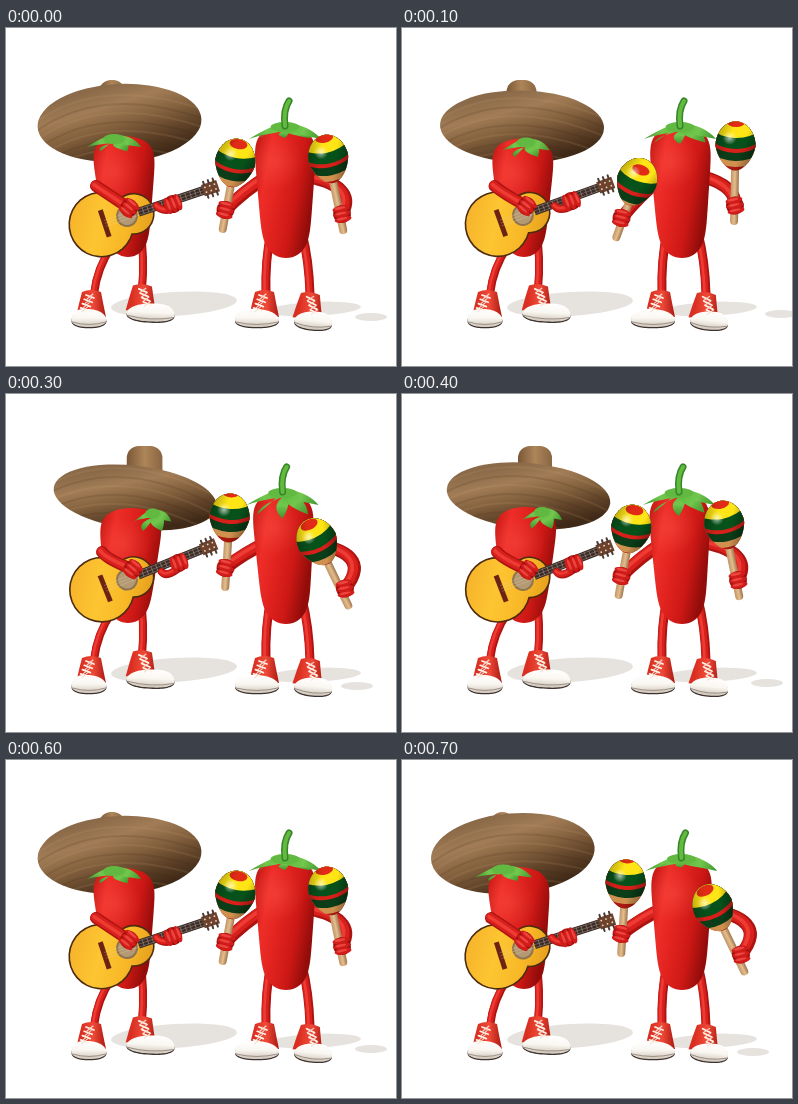
Write an HTML page with a canvas that moves like this. It is 390 px wide and 338 px high and loops after 800 ms.

```html
<!DOCTYPE html>
<html>
<head>
<meta charset="utf-8">
<style>
html, body { margin: 0; height: 100%; overflow: hidden; background: #fff; }
canvas { display: block; }
</style>
</head>
<body>
<canvas id="stage" width="390" height="338"></canvas>
<script>
const c = document.getElementById('stage').getContext('2d');
c.lineCap = c.lineJoin = 'round';

const lerp = (a, b, k) => a + (b - a) * k;
const CLEAR_RED = 'rgba(255,95,80,0)';

function grad(x0, y0, x1, y1, ...colors) {
  const g = c.createLinearGradient(x0, y0, x1, y1);
  colors.forEach((col, i) => g.addColorStop(i / (colors.length - 1), col));
  return g;
}

function glow(x, y, r, inner, outer) {
  const g = c.createRadialGradient(x, y, 0, x, y, r);
  g.addColorStop(0, inner);
  g.addColorStop(1, outer);
  return g;
}

function oval(x, y, rx, ry, fill, rot = 0) {
  c.beginPath();
  c.ellipse(x, y, rx, ry, rot, 0, 7);
  c.fillStyle = fill;
  c.fill();
}

function line(x0, y0, x1, y1, width, color) {
  curve([x0, y0, (x0 + x1) / 2, (y0 + y1) / 2, x1, y1], width, color);
}

function curve([x0, y0, ...rest], width, color) {
  c.beginPath();
  c.moveTo(x0, y0);
  c.quadraticCurveTo(...rest);
  c.lineWidth = width;
  c.strokeStyle = color;
  c.stroke();
}

// Closed outline from a function of 0..1
function outline(point, fill) {
  c.beginPath();
  for (let i = 0; i < 80; i++) c.lineTo(...point(i / 80));
  c.closePath();
  c.fillStyle = fill;
  c.fill();
}

function limb(p, w) {
  curve(p, w, '#ac1411');
  c.save();
  c.translate(-w * .08, -w * .06);
  curve(p, w * .74, '#d8201c');
  c.translate(-w * .08, -w * .05);
  curve(p, w * .3, '#ee3b34');
  c.restore();
}

function fist(x, y, rot) {
  c.save();
  c.translate(x, y);
  c.rotate(rot);
  oval(0, 0, 9, 9, '#9c0f0e');
  for (let i = -1; i < 2; i++) {
    oval(0, i * 5.4, 8.6, 3.3, '#d01d1a');
    oval(-1, i * 5.4 - .8, 5.5, 1.3, '#ec4540');
  }
  c.restore();
}

// Pepper body: rounded at both ends, narrowing downwards
function body(topX, topY, lowX, lowY, radius, taper) {
  const edge = t => radius * (1 - taper * t) * Math.sqrt(1 - (2 * t - 1) ** 6);
  const side = u => {
    const s = u < .5 ? 1 : -1, v = u < .5 ? u * 2 : 2 - u * 2;
    const t = (1 - Math.cos(v * Math.PI)) / 2;
    return [lerp(topX, lowX, t) + s * edge(t), lerp(topY, lowY, t)];
  };
  outline(side, grad(topX - radius, 130, topX + radius, 142, '#c21713', '#ee2d28', '#e0221e', '#cc1815', '#920c0a'));
  c.fillStyle = glow(topX - 9, topY + 36, 28, 'rgba(255,95,80,.35)', CLEAR_RED);
  c.fill();
}

function calyx(x, y, reach, droop, depth, lobes) {
  for (let i = 0; i < lobes; i++) {
    const a = Math.PI * i / (lobes - 1);
    const tx = x - reach * Math.cos(a), ty = y + droop + depth * Math.sin(a);
    const mx = (x + tx) / 2, my = (y + ty) / 2 - 4, w = 4 + 5 * Math.sin(a);
    c.beginPath();
    c.moveTo(x, y - 3);
    c.quadraticCurveTo(mx + w * 1.4, my - 4, tx, ty);
    c.quadraticCurveTo(mx - w * 1.4, my + 6, x, y + 5);
    c.fillStyle = grad(x, y, tx, ty, '#5bb83a', '#72c74e', '#3f942c');
    c.fill();
  }
  oval(x, y + 1, reach * .4, 5, '#62b941');
}

function shoe(x, y, toeX, half, tilt) {
  const dir = Math.sign(toeX - x);
  c.save();
  c.translate(x, y);
  c.rotate(tilt);
  c.beginPath();
  c.moveTo(-9, 1);
  c.quadraticCurveTo(0, -3, 10, 1);
  c.quadraticCurveTo(12, 12, 15, 26);
  c.lineTo(-15, 26);
  c.quadraticCurveTo(-12, 12, -9, 1);
  c.fillStyle = grad(-10, 0, 14, 0, '#d92f22', '#f04a38', '#b01d15');
  c.fill();
  const tx = toeX - x;
  const sole = drop => u => {
    const co = Math.cos(u * 2 * Math.PI), si = Math.sin(u * 2 * Math.PI);
    return [tx + half * Math.sign(co) * Math.abs(co) ** .8, 29 + drop + si * (si > 0 ? 7 : 11 + dir * co * 2)];
  };
  outline(sole(1.3), '#3d3330');
  outline(sole(0), grad(0, 18, 0, 36, '#fff', '#faf7f1', '#cfc5b8'));
  curve([tx - half + 1, 31, tx, 36, tx + half - 1, 31], .8, '#8b7d74');
  for (let i = 0; i < 4; i++) {
    const lx = dir * (1 + i * 1.8), ly = 5 + i * 4.3;
    line(lx - 4, ly - 1, lx + 4, ly + 2, 1.7, '#fff4e8');
    line(lx + 3, ly - 2, lx - 3, ly + 3, 1.1, '#f3ddd0');
  }
  c.restore();
}

function hat(k) {
  const x = lerp(113.5, 126.5, k), y = lerp(95, 102, k), ry = lerp(39, 33, k);
  const top = lerp(106, 133, k), w = lerp(13, 17, k);
  c.beginPath();
  c.roundRect(top - w, 52, 2 * w, 30, [12, 12, 0, 0]);
  c.fillStyle = grad(top - w, 0, top + w, 0, '#7a5737', '#ad8559', '#8a6542');
  c.fill();
  c.save();
  c.translate(x, y);
  c.rotate(lerp(-.05, .09, k));
  oval(0, 0, 82, ry, grad(-8, -ry, 12, ry, '#8b6a49', '#a17c56', '#85623f', '#5f4228', '#3f2917'));
  c.clip();
  for (let i = 0; i < 7; i++) {
    const gy = i * 9 - 24;
    curve([-82, gy + 18, -15, gy - 24, 82, gy + 14], 2, i % 2 ? 'rgba(60,35,15,.14)' : 'rgba(200,160,115,.14)');
  }
  c.restore();
}

function guitar(k) {
  c.save();
  c.translate(121, 188 - 2 * k);
  c.rotate(-.322 - .05 * k);
  const bouts = (inset, fill) => {
    oval(-27, 0, 33 - inset, 33 - inset, fill);
    oval(7, 0, 21 - inset, 21 - inset, fill);
  };
  bouts(0, '#4c2b0e');
  bouts(1.6, grad(-50, -20, 20, 25, '#f7b52c', '#fdc531', '#f8b827', '#e39c1c'));
  oval(0, 0, 11, 11, '#8f7450');
  oval(0, 0, 9, 9, '#b39a74');
  c.fillStyle = '#6b2413';
  c.fillRect(-26, -14, 5, 28);
  c.fillStyle = '#392a28';
  c.fillRect(12, -4.5, 70, 9);
  for (let x = 17; x < 80; x += 5) line(x, -3, x, 3, .7, '#8d7c70');
  for (let y = -3; y < 4; y += 3) line(-23, y, 82, y, .45, 'rgba(225,210,180,.6)');
  c.fillStyle = '#70422b';
  c.fillRect(80, -6, 16, 12);
  for (let x = 83; x < 97; x += 5)
    for (const s of [-1, 1]) {
      line(x, s * 5, x, s * 8.5, 2, '#4d3b34');
      oval(x, s * 2.5, .9, .9, '#ddc');
    }
  c.restore();
}

function guitarist(k) {
  hat(k);
  limb([106, 218, 91, 240, 88, 266], 8);
  limb([134, 200, 139, 230, 136, 261], 8);
  shoe(85, 263, 83, 17.5, 0);
  shoe(136, 257, 146, 24, .05);
  body(117 + 7 * k, lerp(108, 113, k), 122, 229, 34, .42);
  calyx(lerp(108, 140, k), lerp(110, 117, k), lerp(27, 20, k), 9, lerp(5, 10, k), 4);
  guitar(k);
  const hx = lerp(123, 126, k), hy = lerp(180, 176, k);
  const fx = lerp(167, 172, k), fy = lerp(176, 170, k);
  limb([lerp(90, 95, k), 158, 102, 166, hx, hy], 12);
  limb([151 + 4 * k, 178, 156 + 4 * k, 184, fx, fy + 5], 8);
  fist(hx, hy, .7);
  fist(fx, fy, 1.2);
}

function maraca(hx, hy, ex, ey, roll) {
  c.save();
  c.translate(hx, hy);
  c.rotate(Math.atan2(ey - hy, ex - hx) - Math.PI / 2);
  const len = Math.hypot(ex - hx, ey - hy);
  line(0, 22, 0, len - 4, 8, grad(-5, 0, 5, 0, '#b98a5b', '#e4bd8e', '#8c6038'));
  // Egg that narrows towards the handle
  outline(u => {
    const a = u * 2 * Math.PI, s = Math.sin(a);
    return [20 * Math.cos(a) * (1 - .2 * Math.max(0, s)), 24.5 * s];
  }, '#a9180f');
  c.save();
  c.clip();
  const bands = [[18, '#d0914e'], [12, '#0a3d18'], [4, '#d8201a'], [0, '#07521b'], [-11, '#ffe515']];
  for (const [y, color] of bands) oval(0, y + roll - 27, 36, 30, color);
  oval(0, -24 + roll * 1.6, 9, 5, '#e22b16');
  c.fillStyle = grad(-20, -8, 20, 6, 'rgba(0,0,0,.25)', 'rgba(0,0,0,0)', 'rgba(0,0,0,0)', 'rgba(0,0,0,.35)');
  c.fillRect(-25, -30, 50, 60);
  oval(-6, -8, 7, 7, glow(-6, -8, 7, 'rgba(255,255,255,.65)', 'rgba(255,255,255,0)'));
  c.restore();
  c.restore();
}

function shaker(k, m) {
  limb([265, 205, 259, 232, 260, 266], 9);
  limb([296, 205, 303, 232, 304, 266], 9);
  shoe(258, 263, 251, 22, 0);
  shoe(304, 265, 310, 19, .1);
  const left = [219.5, 182 + 8 * m], right = [336 - 3 * m, 186 - 8.5 * m];
  limb([262, 148, 238, 163 + 4 * m, ...left], 13);
  limb([298, 148, 352 - 18 * m, 157, ...right], 13);
  const x = 279 - 2 * k;
  body(x, 98, 280, 230, 33, .32);
  calyx(x, 98, 36, 13, lerp(-1, 11, k), 5);
  const stem = [x, 98, x - 2, 82, x + 4, 73];
  curve(stem, 7, '#37852a');
  curve(stem, 4, '#62bb3e');
  maraca(229 + 5.5 * m, 135 + 15 * m + 4 * m * m, 216 - 3 * m, 205 + 8 * m, 3 + 4 * m);
  maraca(322.5 + 11 * m, 131 - 15 * m + 2 * m * m, 338 - 6 * m, 206 - 9 * m, 1.5 - 1.5 * m);
  fist(...left, .25);
  fist(...right, -.2);
}

function shadows(m) {
  const gray = '#e6e3df';
  oval(168, 276, 63, 12, gray, -.06);
  oval(308, 281, 47, 7, gray, -.05);
  oval(365 + 14 * m, 289 - 3 * m, 16, 4, gray);
}

function draw() {
  const step = Math.floor(performance.now() / 100) % 8;
  // k sways the guitarist once per loop, m shakes the maracas twice
  const k = (1 - Math.SQRT2 * Math.cos((step + 1) * Math.PI / 4)) / 2;
  const m = Math.round(Math.sin(step * Math.PI / 2));
  c.fillStyle = '#fff';
  c.fillRect(0, 0, 390, 338);
  shadows(m);
  guitarist(k);
  shaker(k, m);
  requestAnimationFrame(draw);
}
draw();
</script>
</body>
</html>
```
